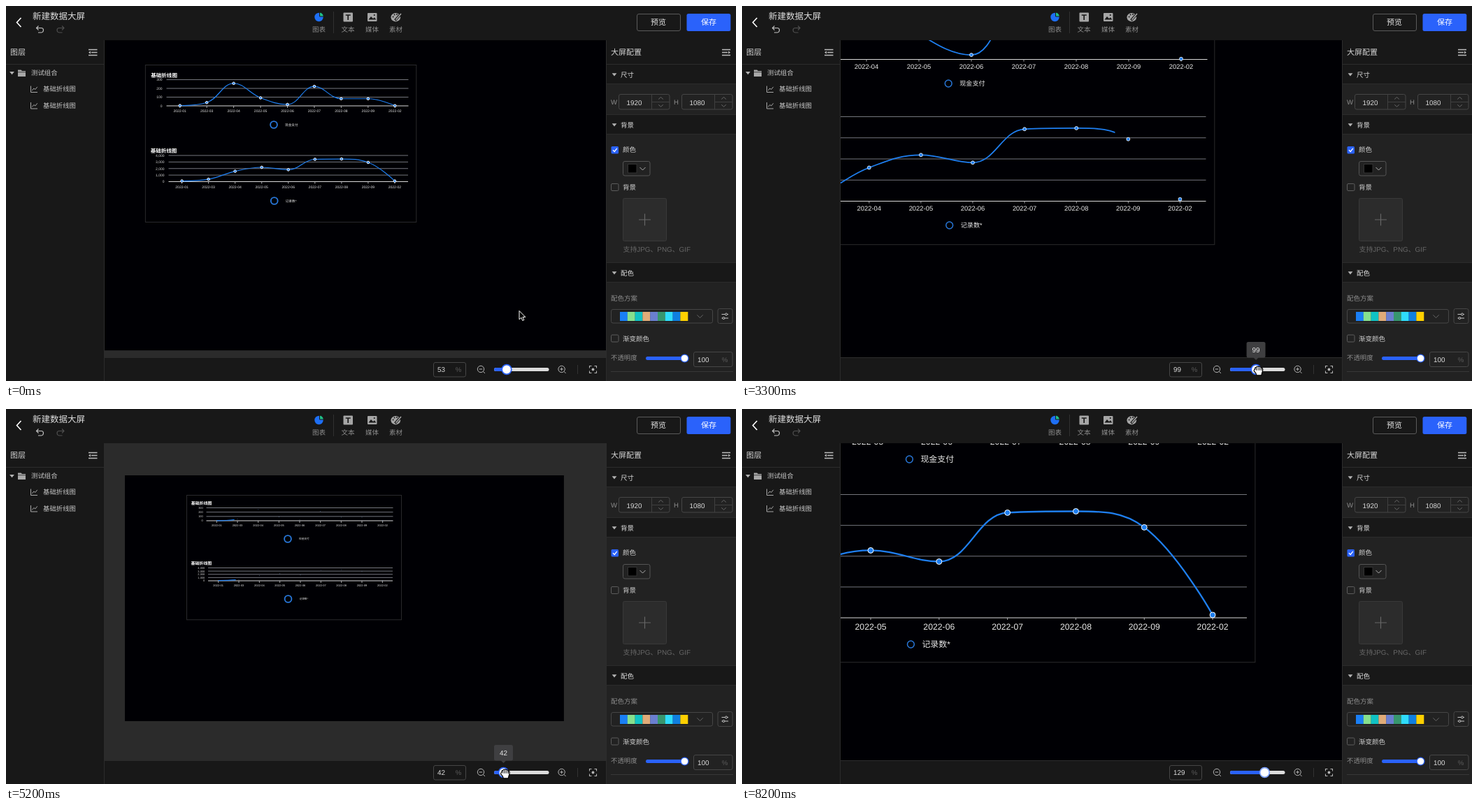
These frames come from a looping animation (1044x537 px, 8300 ms). An HTML page:

```html
<!DOCTYPE html>
<html lang="zh">
<head>
<meta charset="utf-8">
<title>新建数据大屏</title>
<style>
html, body { margin: 0; width: 100%; height: 100%; overflow: hidden; background: #181818; }
svg { display: block; width: 1044px; height: 537px; }
text {
  font-family: "Liberation Sans", "Noto Sans CJK SC", "Noto Sans CJK", sans-serif;
  white-space: pre; text-rendering: geometricPrecision;
}
</style>
</head>
<body>
<script>
const LOOP = 8300, STEP = 100, BLUE = '#2a62fb', LINE = '#1f7ff0';
const NS = 'http://www.w3.org/2000/svg';

function el(tag, attrs, parent) {
  const node = document.createElementNS(NS, tag);
  for (const k in attrs) node.setAttribute(k, attrs[k]);
  if (parent) parent.appendChild(node);
  return node;
}
const svg = el('svg', { viewBox: '0 0 1044 537' }, document.body);
const defs = el('defs', {}, svg);
let layer = svg;

const rect = (x, y, w, h, fill, more) =>
  el('rect', { x, y, width: w, height: h, fill, ...more }, layer);
const box = (x, y, w, h, stroke = '#464646', fill = 'none', rx = 2.5) =>
  rect(x + .5, y + .5, w - 1, h - 1, fill, { stroke, rx });
const path = (d, stroke, width = 1, fill = 'none') =>
  el('path', { d, stroke, 'stroke-width': width, fill }, layer);
const circle = (cx, cy, r, fill, stroke = 'none', width = 1) =>
  el('circle', { cx, cy, r, fill, stroke, 'stroke-width': width }, layer);
function text(x, cy, size, str, fill = '#d4d4d4', anchor = 'start', weight = 400) {
  const node = el('text', {
    x, y: cy + size * .37, 'font-size': size, fill, 'text-anchor': anchor, 'font-weight': weight
  }, layer);
  node.textContent = str;
  return node;
}
function clip(id, x, y, w, h) {
  return el('rect', { x, y, width: w, height: h }, el('clipPath', { id }, defs));
}
function group(attrs, parent = svg) {
  return layer = el('g', attrs, parent);
}

/* ---------- workspace and charts ---------- */
const MONTHS = ['01', '03', '04', '05', '06', '07', '08', '09', '02'];
const CHARTS = [
  { max: 300, rows: 3, name: '现金支付', title: [.15, .27],
    data: [3, 38, 258, 92, 16, 223, 82, 82, 2] },
  { max: 4000, rows: 4, name: '记录数*', title: [.14, 2.32],
    data: [100, 360, 1588, 2188, 1824, 3412, 3456, 2936, 92] }
];
// zoom, then per chart: left, right, top, base, legend x, legend y
const LEVELS = [
  [53, [229.5, 575.5, 105.5, 143, 383, 170], [232.5, 575, 214, 251.5, 383.7, 279]],
  [99, [-9.5, 665.5, -44.5, 76.5, 295.2, 111], [-3.5, 663.5, 158.5, 279.5, 296.7, 314]],
  [42, [286.5, 553.5, 141.5, 160, 403, 186], [289, 553, 227.5, 246, 403.5, 272]],
  [129, [-166, 723, -142.5, 34, 239.4, 72], [-158.3, 722, 122.5, 299, 241.4, 337]]
];

// smooth curve that never overshoots its neighbours
const TENSION = .4;
function smooth(pts) {
  const within = (v, a, b) => Math.max(Math.min(a, b), Math.min(Math.max(a, b), v));
  const ins = [], outs = [];
  pts.forEach((p, i) => {
    const a = pts[i - 1], b = pts[i + 1];
    if (!a || !b) return void (ins[i] = outs[i] = p);
    const la = Math.hypot(p[0] - a[0], p[1] - a[1]);
    const lb = Math.hypot(b[0] - p[0], b[1] - p[1]);
    const axis = [0, 1].map(k => {
      const next = within(p[k] + (b[k] - a[k]) * TENSION * lb / (la + lb), p[k], b[k]);
      const prev = within(p[k] - (next - p[k]) * la / lb, p[k], a[k]);
      return [prev, p[k] + (p[k] - prev) * lb / la];
    });
    ins[i] = axis.map(v => v[0]);
    outs[i] = axis.map(v => v[1]);
  });
  let d = 'M' + pts[0];
  for (let i = 1; i < pts.length; i++) d += `C${outs[i - 1]} ${ins[i]} ${pts[i]}`;
  return d;
}

clip('work', 140, 49, 719, 454);
rect(0, 0, 1044, 537, '#2b2b2b');
const work = el('g', { 'clip-path': 'url(#work)' }, svg);

function drawChart(chart, z, [l, r, top, base, lx, ly], parent, id, left, y0) {
  const g = group({}, parent), gap = (r - l) / 9, small = z < 60;
  text(left + chart.title[0] * z, y0 + chart.title[1] * z, z * .142, '基础折线图', '#fff', 'start', 700);
  for (let i = 0; i <= chart.rows; i++) {
    const y = base - (base - top) * i / chart.rows;
    path(`M${l} ${y}H${r}`, i ? '#74767c' : '#d8d8d8');
    text(l - z * .113, y, z * .0945, (chart.max / chart.rows * i).toLocaleString('en-US'), '#d8d8d8', 'end');
  }
  const pts = chart.data.map((v, i) => [l + gap * (i + .5), base - (base - top) * v / chart.max]);
  pts.forEach(([x], i) => {
    path(`M${x} ${base}v3`, '#bbb', .9);
    text(x, base + 4 + z * .063, z * .095, '2022-' + MONTHS[i], '#e8e8e8', 'middle');
  });
  const reveal = clip(id, l, top - 10, r - l, base - top + 20);
  path(smooth(pts), LINE, Math.max(1.2, z * .0178)).setAttribute('clip-path', `url(#${id})`);
  const dots = pts.map(([x, y]) => {
    const dot = circle(0, 0, Math.max(1.8, z * .031), LINE, '#fff', 1);
    return p => dot.setAttribute('transform', `translate(${x} ${y}) scale(${p})`);
  });
  circle(lx, ly, 4.9, 'none', '#2876d8', small ? 1.9 : 1.5);
  text(lx + 16, ly, z * (small ? .088 : .0925), chart.name, '#e8e8e8');
  return p => {
    reveal.setAttribute('width', (r - l) * p);
    dots.forEach(f => f(p));
  };
}

const views = LEVELS.map(([z, ...grids], n) => {
  const g = group({}, work), d = z - 42;
  rect(170 - 7.45 * d, 95 - 4.18 * d, 14.95 * z, 8.38 * z, '#000004');
  const left = 258.5 - 5.375 * d, y0 = 123.5 - 3.545 * d;
  rect(left, y0, 7.31 * z, 4.245 * z, 'none', { stroke: '#2a2a2c' });
  const reveal = CHARTS.map((c, i) => drawChart(c, z, grids[i], g, `c${n}${i}`, left, y0));
  return { show: on => g.setAttribute('display', on ? 'inline' : 'none'),
           reveal: p => reveal.forEach(f => f(p)) };
});

/* ---------- header ---------- */
group({});
rect(0, 0, 1044, 49, '#181818');
path('M21.5 17L15.5 23.5L21.5 30', '#fff', 1.6);
text(38, 14, 12.5, '新建数据大屏', '#dedede');
const undo = 'M46.5 28.5L43.5 31.5L46.5 34.5M43.7 31.5H50.5Q53.5 31.5 53.5 34.5T50.5 38H46';
path(undo, '#c4c4c4', 1.1);
path(undo, '#505050', 1.1).setAttribute('transform', 'matrix(-1 0 0 1 126.5 0)');
circle(447.5, 16, 6.2, '#1e6ff5');
path('M448.5 15V9A6.2 6.2 0 0 1 454.3 15Z', '#181818', 1, '#1fc08a');
path('M468.5 8V39', '#303030');
const GREY = '#a6a6a6';
rect(482.5, 9.5, 13.5, 13, GREY, { rx: 1 });
path('M485.7 13H492.8M489.2 13V20', '#181818', 1.7);
rect(517, 10, 13.5, 12, GREY, { rx: 1 });
path('M518.5 19.5L522 15L525 18L527 16.3L529.3 19.5Z', 'none', 0, '#181818');
circle(526.8, 13, 1.1, '#181818');
el('ellipse', { cx: 557.3, cy: 16.2, rx: 6.8, ry: 6.2, fill: GREY }, layer);
[[553.6, 15.4], [555.6, 12.6], [559, 12]].forEach(([x, y]) => circle(x, y, 1, '#181818'));
path('M556.5 20.5L565 11', '#181818', 3.4);
path('M557.5 19.8L565 11', GREY, 1.6);
['图表', '文本', '媒体', '素材'].forEach((s, i) =>
  text([447.5, 489, 523.5, 557.5][i], 33.5, 9.5, s, '#8c8c8c', 'middle'));
box(902, 11, 63, 25, '#5a5a5a');
text(933, 23.3, 11, '预览', '#e4e4e4', 'middle');
rect(973.5, 11, 62.8, 25, BLUE, { rx: 2.5 });
text(1005, 23.3, 11, '保存', '#fff', 'middle');

/* ---------- layers panel ---------- */
rect(0, 49, 140, 488, '#181818');
path('M140.5 49V537', '#2c2c2c');
text(6, 66, 11, '图层');
path('M118 62.5H130.5M122 66.5H130.5M118 70.5H130.5', '#bcbcbc', 1.4);
path('M121 64.6V68.4L118 66.5Z', 'none', 0, '#bcbcbc');
path('M0 83.5H140', '#2c2c2c');
const caret = (x, y, fill = '#b4b4b4') =>
  path(`M${x - 3.4} ${y - 2}H${x + 3.4}L${x} ${y + 2.2}Z`, 'none', 0, fill);
caret(8.5, 96);
path('M17 91.5H21.5L23 93H28V101H17Z', 'none', 0, '#a8a8a8');
path('M17 94.7H28', '#181818', .7);
text(36, 95.5, 9.4, '测试组合', '#c8c8c8');
[119, 142.5].forEach(y => {
  path(`M35.5 ${y - 4.5}V${y + 4.5}H45M37.3 ${y + 2}L39.8 ${y - 1}L41.8 ${y + .5}L44.8 ${y - 3.2}`, '#a8a8a8', 1);
  text(53, y - .2, 9.4, '基础折线图', '#c8c8c8');
});

/* ---------- settings panel ---------- */
rect(859, 49, 185, 488, '#222');
path('M858.5 49V537', '#2c2c2c');
rect(859, 49, 185, 34, '#181818');
text(865, 66, 11, '大屏配置');
path('M1024 62.5H1036M1024 66.5H1032M1024 70.5H1036', '#bcbcbc', 1.4);
path('M1033 64.6V68.4L1036 66.5Z', 'none', 0, '#bcbcbc');
[[84, '尺寸'], [156, '背景'], [368, '配色']].forEach(([y, s]) => {
  rect(859, y, 185, 28, '#181818');
  path(`M859 ${y - .5}H1044M859 ${y + 27.5}H1044`, '#2c2c2c');
  caret(870, y + 14.3);
  text(879, y + 14, 9.5, s, '#dcdcdc');
});
// a negative height points up
const chevron = (x, y, w, h, color) =>
  path(`M${x - w} ${y - h / 2}L${x} ${y + h / 2}L${x + w} ${y - h / 2}`, color);
[['W', 865, 876, '1920'], ['H', 955, 966, '1080']].forEach(([name, x, bx, val]) => {
  text(x, 137.5, 9.6, name, '#8c8c8c');
  box(bx, 126, 73.5, 22.5);
  path(`M${bx + 47.5} 126.5V148M${bx + 47.5} 137.5H${bx + 73}`, '#404040');
  text(bx + 22.5, 138, 9.8, val, '#dcdcdc', 'middle');
  chevron(bx + 60.5, 132, 3.3, -3, '#666');
  chevron(bx + 60.5, 142.8, 3.3, 3, '#666');
});
rect(865.5, 201, 10.5, 10.5, BLUE, { rx: 1.5 });
path('M868 206.2L870.2 208.5L873.8 203.8', '#fff', 1.3);
text(882, 205.5, 9.5, '颜色', '#d0d0d0');
box(882, 222, 39.5, 21.5, '#555');
rect(889.5, 226.5, 12.5, 12.5, '#000', { stroke: '#333' });
chevron(910.5, 233, 4, 4, '#b0b0b0');
box(865, 254, 11.5, 11, '#5c5c5c', 'none', 1.5);
text(882, 259, 9.5, '背景', '#d0d0d0');
box(882, 275, 63, 62, '#393939', '#2c2c2c', 2);
path('M905 306H922M913.5 297.5V314.5', '#666', 1.2);
text(882.5, 348, 9.9, '支持JPG、PNG、GIF', '#666');
text(865, 418, 9.5, '配色方案', '#8c8c8c');
box(865, 434, 146, 20.5);
['#1a7ff5', '#86e08e', '#10c2c4', '#e0ab78', '#6a7fd0', '#37966e', '#2fdcfb', '#0f7fe0', '#ffd000']
  .forEach((c, i) => rect(878 + i * 10.8, 438, 10.9, 13, c));
chevron(992.5, 444.5, 4.2, 4.2, '#666');
box(1017.5, 433, 22, 22);
path('M1023.5 441.5H1033M1023.5 447H1033', '#c4c4c4', 1.1);
circle(1030, 441.5, 1.5, '#222', '#c4c4c4');
circle(1026.3, 447, 1.5, '#222', '#c4c4c4');
box(865, 470.5, 11.5, 11, '#5c5c5c', 'none', 1.5);
text(882, 476, 9.5, '渐变颜色', '#d0d0d0');
text(865, 504, 9.4, '不透明度', '#8c8c8c');
rect(915, 502, 56, 5, BLUE, { rx: 2.5 });
circle(970.5, 504.5, 5.4, '#fff', BLUE, 1.2);
box(983, 495, 56.5, 22);
text(989, 506, 9.9, '100', '#dcdcdc');
text(1028, 506, 9.6, '%', '#5c5c5c', 'middle');
path('M865 523.5H1040', '#383838');

/* ---------- zoom bar ---------- */
rect(141, 503, 717, 34, '#181818');
path('M141 503.5H858', '#2c2c2c');
box(611, 510, 47, 21.5);
const field = text(617, 520.5, 9.9, '', '#dcdcdc');
text(647, 520.5, 9.6, '%', '#5c5c5c', 'middle');
[679, 794.6].forEach((x, i) => {
  circle(x, 520, 4.7, 'none', '#b4b4b4');
  path(`M${x + 3.4} 523.4L${x + 6} 526M${x - 2.3} 520H${x + 2.3}` + (i ? `M${x} 517.7V522.3` : ''), '#b4b4b4');
});
path('M817.5 514V527', '#333');
path('M834.5 518.5V515.5H837.5M841.5 515.5H844.5V518.5M844.5 522.5V525.5H841.5M837.5 525.5H834.5V522.5', '#b4b4b4', 1.1);
circle(839.5, 520.5, 1.9, '#b4b4b4');
rect(698, 518, 78.5, 5, '#dcdcdc', { rx: 2.5 });
const fill = rect(698, 518, 10, 5, BLUE, { rx: 2.5 });
const knob = circle(0, 520.5, 6.8, '#fff', BLUE, 1.7);

const tip = group({});
const tipBox = rect(0, 481, 27, 22.5, '#3f3f41', { rx: 2.5 });
path('M-4 503L0 507L4 503Z', 'none', 0, '#3f3f41');
const tipText = text(0, 492.3, 9.9, '', '#e8e8e8', 'middle');

/* ---------- pointer ---------- */
const ring = group({ fill: 'none' });
circle(0, 0, 21.7, 'none', '#000', 4);
circle(0, 0, 23, 'none', '#fff', 1.5);
circle(0, 0, 20.2, 'none', '#fff', 1.2);
const arrow = group({});
path('M0 0V12.3L2.9 9.7L4.8 14L6.8 13.1L5 8.9H8.8Z', '#fff', 1, '#000');
const hand = group({});
path('M-4.6 -1.5Q-4.8 -4.3 -2.9 -3.9Q-2.6 -5.7 -.7 -4.9Q.6 -6 1.8 -4.6Q3.7 -5 3.9 -3.2Q5.8 -3.4 5.6 -.6L4.7 3.2L3.8 6.3H-2.3L-3.4 3.5L-5.8 .6Q-6 -1.2 -4.6 -1.5Z', '#000', 1.1, '#fff');
path('M-2.7 -3.5V-.2M-.4 -4.2V-.2M1.9 -4V-.2M4 -2.8V0', '#000', .9);

/* ---------- timeline ---------- */
const COMMITS = [-1000, 2495, 4130, 5050, 6770];
const SHOWN = [0, 1, 0, 2, 3];
const ZOOM = [[2200, 53], [2300, 66], [2400, 66], [2490, 99], [3600, 99], [4050, 53],
              [4600, 53], [4950, 42], [5600, 42], [6100, 129]];
const GRIP = [[1700, 2], [2400, 5.5], [3300, 3.5], [4300, 5], [5200, 2.5], [6200, .5]];
const PRESSES = [2200, 3500, 4500, 5500];

function at(keys, t) {
  if (t <= keys[0][0]) return keys[0][1];
  for (let i = 1; i < keys.length; i++) {
    const [a, u] = keys[i - 1], [b, v] = keys[i];
    if (t <= b) return u + (v - u) * (t - a) / (b - a);
  }
  return keys[keys.length - 1][1];
}
const show = (node, on) => node.setAttribute('display', on ? 'inline' : 'none');
const move = (node, x, y, s = 1) => node.setAttribute('transform', `translate(${x} ${y}) scale(${s})`);

function render(t) {
  const stage = COMMITS.filter(c => c <= t).length - 1;
  views.forEach((v, i) => v.show(i === SHOWN[stage]));
  views[SHOWN[stage]].reveal(Math.min(1, (t - COMMITS[stage]) / 1000));

  const zoom = Math.round(at(ZOOM, t)), x = 694.1 + zoom * .4138;
  field.textContent = tipText.textContent = zoom;
  fill.setAttribute('width', x - 698);
  knob.setAttribute('cx', x);
  knob.setAttribute('stroke', t < 6900 ? BLUE : '#7da0ff');

  const hover = t >= 1700 && t < 6900;
  const w = zoom > 99 ? 33 : 27;
  tipBox.setAttribute('x', -w / 2);
  tipBox.setAttribute('width', w);
  move(tip, x, 0);
  show(tip, hover);

  let px = x + at(GRIP, t), py = 522;
  if (t < 1700) {
    px = at([[1000, 734], [1700, 718]], t);
    py = at([[1000, 436.5], [1700, 520]], t);
  } else if (!hover) {
    px = at([[6900, 748], [7200, 1060]], t);
    py = at([[6900, 521], [7200, 400]], t);
  }
  show(hand, hover);
  show(arrow, !hover && px < 1050);
  move(hand, px, py, 1.1);
  move(arrow, px, py);

  const press = PRESSES.find(p => t >= p && t < p + 300);
  show(ring, press !== undefined);
  if (press !== undefined) move(ring, px, py - .5, Math.min(1, .5 + (t - press) / 400));
}

const start = performance.now();
function tick() {
  const t = (performance.now() - start) % LOOP;
  render(Math.floor(t / STEP) * STEP);
  requestAnimationFrame(tick);
}
tick();
</script>
</body>
</html>
```
